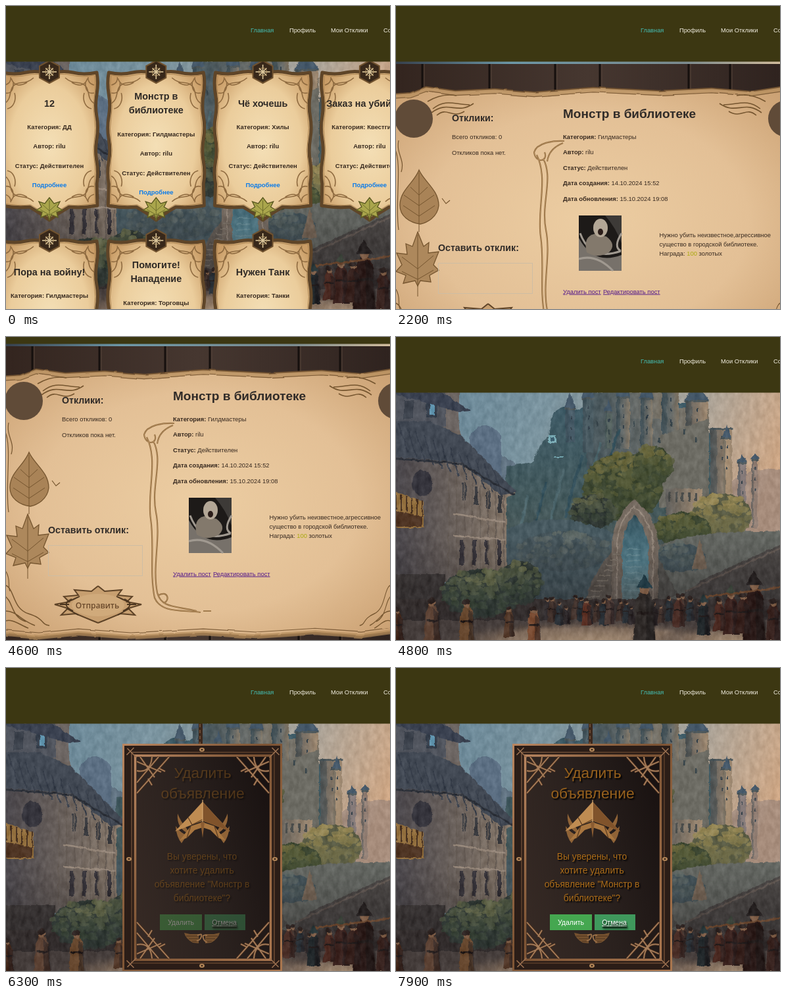
An HTML page for the animation above (8 s loop, 584x460 px).

```html
<!DOCTYPE html>
<html lang="ru">
<head>
<meta charset="utf-8">
<title>Доска объявлений</title>
<style>
html, body { margin: 0; width: 584px; height: 460px; overflow: hidden; background: #3b3612; }
#stage { position: relative; width: 584px; height: 460px; overflow: hidden; }
#stage > svg { position: absolute; left: 0; top: 0; overflow: visible; will-change: transform; }
text { font-family: "Liberation Sans", Arial, sans-serif; white-space: pre; }
.b { font-weight: bold; }
.mid { text-anchor: middle; }

/* header */
.nav text { font-size: 9.3px; fill: #f1ede0; }
.nav text.on { fill: #45beb4; }

/* notice cards */
.card { font-size: 9.5px; font-weight: bold; fill: #37291e; text-anchor: middle; }
.card .title { font-size: 14.4px; fill: #2e2925; }
.card .more { fill: #0a7bea; }

/* post page */
.post text { font-size: 9.4px; fill: #37291f; }
.post .h1 { font-size: 19px; font-weight: bold; fill: #302b28; }
.post .h2 { font-size: 14.2px; font-weight: bold; fill: #302b28; }
.post .link { fill: #551a8b; text-decoration: underline; }
.post .send { font: 600 12px "Open Sans", sans-serif; fill: #6b4a2c; }

/* delete board */
.msg { text-anchor: middle; }
.msg .bronze { fill: #ac6c18; font-size: 13.8px; text-shadow: 2px 2px 2px #000; }
.msg .big { font-size: 22.8px; fill: #96601c; }
.msg .btn { fill: #fff; font-size: 10.5px; }
.msg .under { text-decoration: underline; text-shadow: 1px 2px 2px #000; }

.grid { animation: grid 8s step-end infinite; }
.post { animation: post 8s step-end infinite, scroll 8s step-end infinite; }
.nav { animation: scroll 8s step-end infinite; }
.board { animation: board 8s step-end infinite, drop 8s infinite; }
.msg { animation: fade 8s infinite; }
.hover { animation: hover 8s step-end infinite; }
.press { animation: press 8s step-end infinite; }
@keyframes grid { 0% { visibility: visible; } 26.25%, 100% { visibility: hidden; } }
@keyframes post { 0% { visibility: hidden; } 26.25% { visibility: visible; } 60%, 100% { visibility: hidden; } }
@keyframes scroll { 0% { transform: none; } 40% { transform: translateY(-74px); } 60%, 100% { transform: none; } }
@keyframes board { 0% { visibility: hidden; } 63.75%, 100% { visibility: visible; } }
@keyframes drop {
  0%, 63.75% { transform: translateY(-410px); animation-timing-function: ease; }
  76.25%, 100% { transform: none; }
}
@keyframes fade {
  0%, 72.5% { opacity: 0; animation-timing-function: ease; }
  97.5%, 100% { opacity: 1; }
}
@keyframes hover { 0% { fill: #0a7bea; } 16.25%, 100% { fill: #0056b3; text-decoration: underline; } }
@keyframes press { 0% { fill: #551a8b; } 56.25% { fill: #e01010; } 57.5%, 100% { fill: #551a8b; } }
</style>
</head>
<body>
<div id="stage">
<svg class="bg" width="584" height="460">
  <defs>
    <linearGradient id="sky" x2="1" y2=".25">
      <stop stop-color="#5f7f92"/><stop offset=".4" stop-color="#7b949f"/>
      <stop offset=".75" stop-color="#aaa49a"/><stop offset="1" stop-color="#cfa683"/>
    </linearGradient>
    <linearGradient id="stone"><stop stop-color="#47565c"/><stop offset=".6" stop-color="#686b68"/><stop offset="1" stop-color="#837868"/></linearGradient>
    <linearGradient id="lit"><stop stop-color="#5f5e5b"/><stop offset="1" stop-color="#a18b73"/></linearGradient>
    <linearGradient id="wall"><stop stop-color="#47444a"/><stop offset=".5" stop-color="#6a615c"/><stop offset="1" stop-color="#88796a"/></linearGradient>
    <linearGradient id="cliff" x2="0" y2="1"><stop stop-color="#3d5a66"/><stop offset=".6" stop-color="#44595c"/><stop offset="1" stop-color="#4a5452"/></linearGradient>
    <linearGradient id="water" x2="0" y2="1"><stop stop-color="#34505b"/><stop offset=".5" stop-color="#588593"/><stop offset="1" stop-color="#6c8082"/></linearGradient>
    <linearGradient id="dusk" x2="0" y2="1"><stop stop-color="#1d1a1c" stop-opacity="0"/><stop offset="1" stop-color="#1d1a1c" stop-opacity=".5"/></linearGradient>
    <radialGradient id="ground"><stop stop-color="#a28a72"/><stop offset=".6" stop-color="#7d6a5b"/><stop offset="1" stop-color="#453c39" stop-opacity="0"/></radialGradient>
    <radialGradient id="card" r=".62"><stop stop-color="#f4dfb6"/><stop offset=".65" stop-color="#ebcd9c"/><stop offset="1" stop-color="#c99c66"/></radialGradient>
    <radialGradient id="paper" r=".68"><stop stop-color="#eccda2"/><stop offset=".6" stop-color="#e3c096"/><stop offset="1" stop-color="#cba173"/></radialGradient>
    <linearGradient id="wood" x2="1"><stop stop-color="#33251f"/><stop offset=".5" stop-color="#463730"/><stop offset="1" stop-color="#2f231f"/></linearGradient>
    <linearGradient id="strip"><stop stop-color="#37414e"/><stop offset=".3" stop-color="#6d98a8"/><stop offset=".75" stop-color="#7c8c90"/><stop offset="1" stop-color="#d2bd9d"/></linearGradient>
    <linearGradient id="bronze" x2="1" y2="1"><stop stop-color="#b98660"/><stop offset=".45" stop-color="#7d5434"/><stop offset="1" stop-color="#ab774f"/></linearGradient>
    <linearGradient id="panel" y1=".7" x2="1" y2=".3"><stop stop-color="#352924"/><stop offset=".5" stop-color="#2a211e"/><stop offset="1" stop-color="#1a1312"/></linearGradient>
    <filter id="paint" x="0" y="0" width="1" height="1" color-interpolation-filters="sRGB">
      <feTurbulence type="fractalNoise" baseFrequency=".13 .08" numOctaves="4" seed="4" result="n"/>
      <feDisplacementMap in="SourceGraphic" in2="n" scale="5" xChannelSelector="R" yChannelSelector="G"/>
      <feGaussianBlur stdDeviation=".7" result="d"/>
      <feColorMatrix in="n" values="0 0 0 1 0 0 0 0 1 0 0 0 0 1 0 0 0 0 0 1"/>
      <feComposite in2="d" operator="arithmetic" k2=".14" k3="1" k4="-.07"/>
    </filter>
    <filter id="rough"><feTurbulence type="fractalNoise" baseFrequency=".04" numOctaves="2" seed="2"/>
      <feDisplacementMap in="SourceGraphic" scale="3" xChannelSelector="R" yChannelSelector="G"/></filter>
  </defs>
  <g id="scene" filter="url(#paint)"></g>
</svg>
<svg class="grid" width="584" height="460"></svg>
<svg class="post" width="584" height="460"></svg>
<svg class="board" width="584" height="460"></svg>
<svg class="nav" width="584" height="460">
  <rect width="584" height="84.5" fill="#3c3712"/>
  <text class="on" x="372" y="40">Главная</text><text x="431" y="40">Профиль</text>
  <text x="494" y="40">Мои Отклики</text><text x="574" y="40">Создать</text>
</svg>
</div>
<script>
const $ = s => document.querySelector(s);
let seed = 7;
const rnd = () => (seed = seed * 16807 % 2147483647) / 2147483647;
const times = (n, f) => Array.from({ length: n }, (_, i) => f(i)).join('');
const rect = (x, y, w, h, fill, more = '') => `<rect x="${x}" y="${y}" width="${w}" height="${h}" fill="${fill}" ${more}/>`;
const shape = (d, fill, more = '') => `<path d="${d}" fill="${fill}" ${more}/>`;
const line = (d, stroke, w = 1, more = '') => `<path d="${d}" fill="none" stroke="${stroke}" stroke-width="${w}" ${more}/>`;
const oval = (x, y, rx, ry, fill, more = '') => `<ellipse cx="${x}" cy="${y}" rx="${rx}" ry="${ry}" fill="${fill}" ${more}/>`;
const text = (x, y, s, cls = '') => `<text x="${x}" y="${y}" class="${cls}">${s}</text>`;
const at = (x, y, s, sx = 1, sy = 1) => `<g transform="translate(${x} ${y}) scale(${sx} ${sy})">${s}</g>`;

// ---- painted town ----
const tower = (x, w, top, base, fill, roof) =>
  rect(x, top, w, base - top, fill) + rect(x - 1.5, top, w + 3, 3, '#515a5c') +
  rect(x, top, w * .3, base - top, '#2f3f48', 'opacity=".35"') +
  (roof ? shape(`M${x - 2} ${top}L${x + w / 2} ${top - roof}L${x + w + 2} ${top}Z`, '#46596a') : '') +
  times(3, i => rect(x + w * .5, top + 12 + i * 16, 2, 5, '#35424c'));
// foliage is shaded from dark below to light above
const leaves = (x, y, rx, ry, n, cols) => oval(x, y, rx, ry, cols[0]) + times(n, i => {
  const a = rnd() * 6.28, r = Math.sqrt(rnd()), s = 2.5 + rnd() * 5;
  const shade = Math.floor((1 - Math.sin(a) * r) / 2 * cols.length * .8 + rnd() * .9);
  return oval(x + Math.cos(a) * r * rx, y + Math.sin(a) * r * ry, s, s * .7, cols[Math.min(shade, cols.length - 1)], 'opacity=".8"');
});
const man = (x, y, h, robe, hat) =>
  shape(`M${x - h * .17} ${y}Q${x - h * .13} ${y - h * .4} ${x - h * .13} ${y - h * .62}L${x - h * .05} ${y - h * .76}H${x + h * .06}L${x + h * .13} ${y - h * .6}Q${x + h * .1} ${y - h * .4} ${x + h * .17} ${y}Z`, robe) +
  rect(x - h * .12, y - h * .47, h * .24, h * .04, '#241d1c') +
  shape(`M${x + h * .02} ${y - h * .7}L${x + h * .13} ${y - h * .6}L${x + h * .17} ${y}H${x + h * .03}Z`, '#1f1a1b', 'opacity=".5"') +
  oval(x, y - h * .8, h * .07, h * .08, '#7d5d47') +
  (hat ? shape(`M${x - h * .12} ${y - h * .8}L${x - 1} ${y - h}L${x + h * .12} ${y - h * .8}Z`, hat) : oval(x - 1, y - h * .84, h * .08, h * .06, '#2d2321'));
const green = ['#3c4631', '#475036', '#575c3b', '#6b693f'], gold = ['#5a5c45', '#6e6b48', '#837a4e', '#998a57'];
const dark = ['#2f3733', '#3a4338', '#4a5140', '#5f6347'], haze = ['#45545a', '#4c5a5d', '#566261', '#606a66'];

$('#scene').innerHTML =
  rect(-10, 60, 610, 420, 'url(#sky)') +
  oval(570, 280, 90, 80, '#978379', 'opacity=".7"') + oval(150, 260, 60, 80, '#5f7180') +
  shape('M112 240V150Q134 118 160 150V240Z', '#5c6f83') +
  tower(520, 12, 190, 300, '#857a79', 12) + tower(541, 9, 185, 290, '#927f74', 8) +
  // castle
  shape('M168 350V196L208 190 218 166 232 150 238 116 252 106 272 112 300 100H440L480 150 500 330H168Z', 'url(#cliff)') +
  rect(290, 108, 186, 92, 'url(#stone)') + rect(300, 84, 120, 40, 'url(#stone)') +
  tower(258, 14, 108, 160, '#475b67', 24) + tower(284, 16, 92, 175, '#4b5c63', 30) +
  tower(318, 10, 112, 170, '#55625f', 16) + tower(335, 20, 90, 170, 'url(#stone)', 40) + tower(372, 18, 92, 185, 'url(#stone)', 34) +
  tower(404, 26, 80, 200, 'url(#stone)') + tower(440, 34, 96, 180, 'url(#lit)', 26) +
  tower(478, 33, 138, 255, 'url(#lit)') + tower(498, 10, 152, 246, '#a58e74', 18) +
  shape('M400 150L476 124V250L400 260Z', '#6d6c64') +
  times(9, i => rect(304 + i * 19, 128 + i % 3 * 12, 2.5, 8, '#39464c')) +
  times(6, i => line(`M${186 + i * 24} ${310 - i * 12}q8-40 ${14 + i * 4}-${70 + i * 8}`, i % 2 ? '#34505b' : '#4d666c', 4)) +
  rect(231, 149, 13, 12, '#78a9b2') + rect(235, 152, 6, 6, '#36596a') + rect(240, 181, 15, 2, '#78a9b2') +
  leaves(345, 228, 60, 52, 220, green) + leaves(390, 195, 30, 30, 70, green) + leaves(300, 265, 34, 26, 70, dark) +
  rect(410, 230, 55, 40, 'url(#lit)') + times(5, i => rect(414 + i * 10, 236, 4, 14, '#4b4d4b')) +
  leaves(495, 270, 46, 32, 130, gold) + leaves(436, 292, 42, 26, 90, green) +
  shape('M400 316Q470 290 600 296V410H390Z', '#646762') +
  shape('M168 292Q240 258 335 300V410H165Z', '#485a61') + leaves(255, 325, 70, 30, 90, haze) + leaves(430, 335, 40, 22, 50, haze) +
  // arch and stairs
  shape('M285 410Q300 350 334 322L338 410Z', '#625b54') + shape('M396 330L428 390 400 412Z', '#54534f') +
  shape('M328 410V312Q334 270 362 246Q394 270 399 312V410Z', '#766b61') +
  line('M336 405V312Q340 276 362 257Q386 276 391 312V405', '#93867a', 2) +
  shape('M344 412V318Q347 284 363 270Q380 286 384 318V415Z', 'url(#water)') +
  times(9, i => line(`M${351 - i * .7} ${322 + i * 9}h${20 + i * 1.3}`, '#7699a0')) +
  times(9, i => line(`M${330 - i * 5} ${330 + i * 8}h${12 + i}`, '#857b70', 1.5)) +
  shape('M450 352L462 306 473 352Z', '#7a6959') +
  shape('M425 400L470 366 600 308V425H425Z', '#4c4846') + line('M440 386L590 318', '#655b55', 3) +
  // left house
  shape('M-10 60H92L98 150 182 238 168 244V372H-10Z', 'url(#wall)') +
  rect(-10, 60, 86, 76, '#50545d') + rect(76, 70, 20, 72, '#6d6663') +
  rect(46, 90, 17, 32, '#363f4c') + rect(51, 94, 7, 24, '#5f93ad') + rect(12, 96, 14, 28, '#3c424c') +
  shape('M-10 84H70L114 112 96 114Z', '#3a4150') +
  shape('M-10 128H52L100 150 184 236 160 240 98 190-10 182Z', '#424954') +
  times(12, i => line(`M${4 + i * 13} ${132 + i * 6}l14 44`, '#363d49', 2)) + line('M-10 184L98 192 180 240', '#2c3038', 3) +
  times(4, i => rect(101 + i * 18, 222 + i * 6, 6, 26, '#3a3b3f')) + times(4, i => rect(97 + i * 19, 308, 6, 38, '#37343a')) +
  times(8, i => line(`M${80 + i * 12} ${205 + i * 5}V360`, '#655b54', 1.5)) + line('M88 268L167 282M88 302L167 308', '#96877a', 2.5) +
  oval(40, 222, 15, 20, '#36353d') +
  shape('M-10 232L42 250V290H-10Z', '#93703f') + shape('M-10 262L40 272V288H-10Z', '#4f3524') +
  times(6, i => line(`M${i * 8} ${238 + i * 2}v24`, '#4a3322', 2)) +
  // square and crowd
  rect(-10, 360, 84, 110, '#403b3a') + rect(-10, 398, 610, 80, '#453d3b') +
  rect(-10, 300, 610, 130, 'url(#dusk)') + oval(300, 462, 240, 34, 'url(#ground)') + oval(510, 462, 120, 24, 'url(#ground)') +
  leaves(130, 388, 60, 36, 190, dark) + leaves(188, 372, 34, 32, 90, dark) +
  times(22, i => man(226 + i * 11 + rnd() * 6, 430 + rnd() * 8, 30 + rnd() * 16, ['#302b2d', '#43332d', '#2a3036'][i % 3])) +
  man(290, 438, 46, '#5c3226') + man(325, 436, 50, '#4c3b36') + man(2, 464, 60, '#44291c') + man(55, 466, 78, '#5c4234') +
  man(108, 466, 76, '#67482f') + man(172, 456, 52, '#523829') + man(210, 466, 64, '#7c4e35') +
  man(430, 440, 56, '#4c3029') + man(468, 452, 62, '#23292c', '#2c3a3c') + man(510, 452, 76, '#3b231f', '#3a4239') +
  man(492, 446, 56, '#4b2a22') + man(545, 466, 112, '#2b1b19', '#252020') + man(528, 450, 70, '#35201c') + man(574, 460, 70, '#38231f') +
  line('M470 395L600 378', '#66452f', 3) + man(378, 468, 108, '#312c2a', '#223a44');

// ---- notice cards ----
const curl = line('M-68 48c13-8 4-24 18-30c8-3 16 0 26-9M-68 32c9 2 14-4 13-17M-64 56c10-2 14-14 11-24M-58 10c4 12 14 12 24 6M-68 20c8-2 10-8 9-12', '#8f6b40', 1.6);
const corners = curl + at(0, 0, curl, -1) + at(0, 206, curl, 1, -1) + at(0, 206, curl, -1, -1);
const edge = 'M-72 1Q-52 5-36 1T0 3Q20-3 36 1T72 1Q75 16 72 34T72 68T72 102T72 136T72 170L73 203Q50 207 30 205Q14 214 0 225Q-14 214-30 205Q-50 207-73 203L-72 170Q-75 153-72 136T-72 102T-72 68T-72 34T-72 1Z';
const rays = times(8, i => `<path d="M0 0V-${i % 2 ? 8 : 11}" stroke="#dcc79c" stroke-width="1.6" transform="rotate(${i * 45})"/>`);
const cardArt = shape(edge, 'url(#card)', 'stroke="#5f4528" stroke-width="5" stroke-linejoin="round"') +
  line(edge, '#a98250', 1, 'transform="translate(0 4) scale(.95 .965)"') + corners +
  shape('M0-17L15-9V9L0 17-15 9V-9Z', '#38281a', 'stroke="#70522f" stroke-width="2"') + rays +
  '<circle r="6" fill="none" stroke="#b89a68"/>' +
  at(0, 207, shape('M0 18L-3 10-13 14-11 6-20 3-12-2-16-10-7-7 0-16 7-7 16-10 12-2 20 3 11 6 13 14 3 10Z', '#aaa64c', 'stroke="#5c5a22" stroke-width="1.4"') +
    line('M0 18V-12M0 10L-14 2M0 10L14 2M0 4L-11-6M0 4L11-6', '#6f6d2c'));
const author = 'rilu';
const cards = [
  [['12'], 'ДД'], [['Монстр в', 'библиотеке'], 'Гилдмастеры'], [['Чё хочешь'], 'Хилы'], [['Заказ на убийство'], 'Квестгиверы'],
  [['Пора на войну!'], 'Гилдмастеры'], [['Помогите!', 'Нападение'], 'Торговцы'], [['Нужен Танк'], 'Танки']
];
$('.grid').innerHTML = cards.map(([title, kind], i) => {
  const shift = title.length > 1 ? 11 : 0;
  const rows = [`Категория: ${kind}`, `Автор: ${author}`, 'Статус: Действителен', 'Подробнее'];
  return `<g class="card" transform="translate(${66 + i % 4 * 162.3} ${i < 4 ? 100 : 356})">${cardArt}` +
    title.map((s, k) => text(0, 52.5 - shift + k * 21.5, s, 'title')).join('') +
    rows.map((s, k) => text(0, 86.5 + shift + k * 29.5, s, k < 3 ? '' : i === 1 ? 'more hover' : 'more')).join('') + '</g>';
}).join('');

// ---- post page ----
const ink = '#75552f';
const sheet = 'M-8 134L22 132 46 123 90 129 150 126 210 131 300 124 400 129 480 125 540 130 592 122V521L540 528 470 523 380 529 300 524 190 530 110 524 50 530-8 525Z';
const leafLook = `stroke="${ink}" stroke-width="1.3"`;
const oneLeaf = shape('M0-44C8-26 30-14 30 10C28 28 12 36 2 38C-14 36-30 26-29 8C-28-14-8-24 0-44Z', '#a98357', leafLook) +
  line('M0-40V50M0 26L-24 10M0 26L24 10M0 10L-23-6M0 10L23-6M0-6L-13-18M0-6L13-18', ink);
const lobedLeaf = shape('M0-48L9-26 17-32 16-16 32-18 24 2 32 10 18 18 20 28 4 26 0 34-4 26-22 30-18 18-33 12-24 2-32-16-16-14-18-30-8-26Z', '#ad885c', leafLook) +
  line('M0-44V50M0 24L-24 12M0 24L24 10M0 8L-24-10M0 8L24-12', ink);
const vine = 'M256 205C238 204 214 208 210 222C212 240 232 236 226 222M224 232C240 262 220 300 228 340S222 420 230 462C236 486 258 482 290 490M214 226C232 262 214 310 220 350S218 430 226 470C236 494 270 488 296 492M230 236C232 220 244 212 254 208M232 466c14-8 18 8 8 12M300 490h12';
const sprig = 'M54 162C80 142 92 166 118 148M56 156C76 140 90 150 112 150M62 166C78 152 84 172 104 160M48 145Q70 132 92 136';
const root = 'M-4 450C14 452 8 486 34 494S52 510 66 512M-4 466C12 474 6 498 30 506M0 490C16 490 22 504 44 512M-4 506C10 500 22 512 34 516';
const thorn = 'M0-28L10-20 36-22 30-14 52-12 44-4 66 0 46 6 56 16 34 14 10 24 0 28';
const field = (x, y, name, val) => `<text x="${x}" y="${y}"><tspan class="b">${name}:</tspan> ${val}</text>`;
$('.post').innerHTML =
  rect(0, 84, 584, 5, 'url(#strip)') + rect(0, 88, 584, 447, 'url(#wood)') +
  [40, 142, 242, 310, 445, 508].map(x => line(`M${x} 88V535`, '#16100e', 3) + line(`M${x + 3} 88V535`, '#56453b')).join('') +
  `<g filter="url(#rough)">${shape(sheet, 'url(#paper)', 'stroke="#6b4d2f" stroke-width="2.5" stroke-linejoin="round"')}` +
  line(sheet, '#b58d5d', 7, 'transform="translate(0 5) scale(1 .99)" opacity=".7"') +
  line(sheet, '#7d5c38', 1.2, 'transform="translate(0 11) scale(1 .966)"') + '</g>' +
  line(vine, '#8b683e', 2.2) + line(vine, '#c39a66', .8) +
  line(sprig, ink, 1.6) + at(610, 0, line(sprig, ink, 1.6), -1) +
  line(root, ink, 1.5) + at(584, 0, line(root, ink, 1.4), -.7) +
  line('M4 204C0 226 14 232 8 252M-2 216C10 240-2 300 4 340M0 430C8 444 2 452 6 460M70 292l6 8 6-5', ink, 1.2) +
  oval(27, 171, 29, 29, '#604b38') + oval(594, 171, 28, 28, '#604b38') +
  at(35, 293, oneLeaf) + at(33, 391, lobedLeaf) +
  text(85, 175, 'Отклики:', 'h2') + text(85, 202, 'Всего откликов: 0') + text(85, 225.5, 'Откликов пока нет.') +
  text(64, 371.5, 'Оставить отклик:', 'h2') + rect(64.5, 390.5, 143, 46, 'none', 'stroke="#cdbda4"') +
  at(140, 480, [1, -1].map(s => at(0, 0, shape(thorn + 'Z', '#c79f70') + line(thorn, '#5e4327', 2) +
    line('M40-8Q58 0 38 10M46-4L28-12M48 6L30 16M44 0h14', '#4c3620', 2), s)).join('') + oval(0, 1, 40, 17, '#d0aa7b')) +
  text(139, 485.5, 'Отправить', 'send mid') +
  text(254, 170, 'Монстр в библиотеке', 'h1') +
  [['Категория', 'Гилдмастеры'], ['Автор', author], ['Статус', 'Действителен'], ['Дата создания', '14.10.2024 15:52'], ['Дата обновления', '15.10.2024 19:08']]
    .map(([k, v], i) => field(254, 201.5 + i * 23.6, k, v)).join('') +
  // picture
  rect(278, 318, 65, 84, '#1d1a18') + shape('M318 318H343V360Q334 336 318 318Z', '#3d3a37') +
  shape('M278 352Q300 394 343 378V402H278Z', '#77716a') + line('M280 345Q296 388 342 372M278 384Q305 376 330 402M343 345Q330 366 342 372', '#a09990', 3) +
  shape('M290 374Q284 350 302 346L320 350Q336 362 324 374Q306 384 290 374Z', '#83796c') + oval(311, 337, 11, 14, '#b3a796') +
  oval(311, 343, 4, 5, '#2b1d19') +
  text(400.5, 351, 'Нужно убить неизвестное,агрессивное') + text(400.5, 365, 'существо в городской библиотеке.') +
  '<text x="400.5" y="379">Награда: <tspan fill="#a8a80a">100</tspan> золотых</text>' +
  text(254, 436.5, 'Удалить пост', 'link press') + text(315, 436.5, 'Редактировать пост', 'link');

// ---- delete board ----
const bars = 'M3 58L52 3M3 42L36 3M8 3L30 34M3 10L40 26M3 24Q24 28 26 3M36 20l10 5M20 36l6 10';
const knot = line(bars, '#4a2f1e', 3.4) + line(bars, '#a67d5a', 1.8);
const frame = (x, y, w, h, s) => rect(x, y, w, h, 'none', `stroke="url(#bronze)" stroke-width="${s}"`);
const half = shape('M-38-15Q-33-2-24 8L-20 16Q-40 8-38-15ZM-41 4Q-34 14-24 18L-32 30Q-40 20-41 4Z', '#8f6337') +
  shape('M0-2L-18 4-35 26-24 22-12 10 0 6Z', '#a87640') + shape('M0-33L-22-9-42 12-16 2 0-4Z', '#bf8c52') +
  line('M-22-9L-16 2M-18 4L-24 22M0-6L-16 2', '#5a3a1f', 1.2);
const feather = shape('M5-7H18L27-9Q25 0 14 6L5 7Z', '#76522f') + line('M6-4H24M6 0H20M6 4H15', '#4a3220', 1.2);
$('.board').innerHTML =
  line('M296-320V118', '#3d281c', 6) + line('M295-320V118', '#6b4a33', 2, 'stroke-dasharray="5 4"') +
  rect(177, 115, 243, 346, '#2b1d17') + frame(178.5, 116.5, 240, 343, 3) +
  rect(196, 132, 207, 312, 'url(#panel)') + frame(196.5, 133, 206, 310, 3.5) + frame(191, 128, 217, 320, .8) +
  [[1, 1], [-1, 1], [1, -1], [-1, -1]].map(([sx, sy]) => at(299.5 - sx * 103.5, 288 - sy * 156, knot, sx, sy) +
    at(299.5 - sx * 119, 288 - sy * 170, line('M3 14L14 3M4 4L18 18', '#9a7050', 1.6), sx, sy)).join('') +
  [[187, 290], [409, 290], [298, 124], [298, 452]].map(([x, y]) => oval(x, y, 4, 3, '#b58859') + oval(x, y, 1.5, 1.3, '#3a261a')).join('') +
  at(299, 236, half + at(0, 0, half, -1) + shape('M0-33L22-9 42 12 16 2 0-4Z', '#80532b') +
    shape('M-3-2L0 22 3-2Z', '#8a5c32') + line('M0-36V-2', '#d8ab73', 1.2)) +
  at(298, 411, feather + at(0, 0, feather, -1) + line('M-7-5q8-4 6 2t-7 6M8-5q-8-2-6 4t6 6', '#9a7049', 2)) +
  '<g class="msg">' +
  text(299, 167, 'Удалить', 'bronze big') + text(299, 198, 'объявление', 'bronze big') +
  ['Вы уверены, что', 'хотите удалить', 'объявление "Монстр в', 'библиотеке"?'].map((s, i) => text(298, 291 + i * 21.1, s, 'bronze')).join('') +
  rect(234, 374, 64, 24, '#45a750') + rect(302, 374, 62, 24, '#3f985c') +
  text(266, 390, 'Удалить', 'btn') + text(332, 390, 'Отмена', 'btn under') + '</g>';
</script>
</body>
</html>
```
